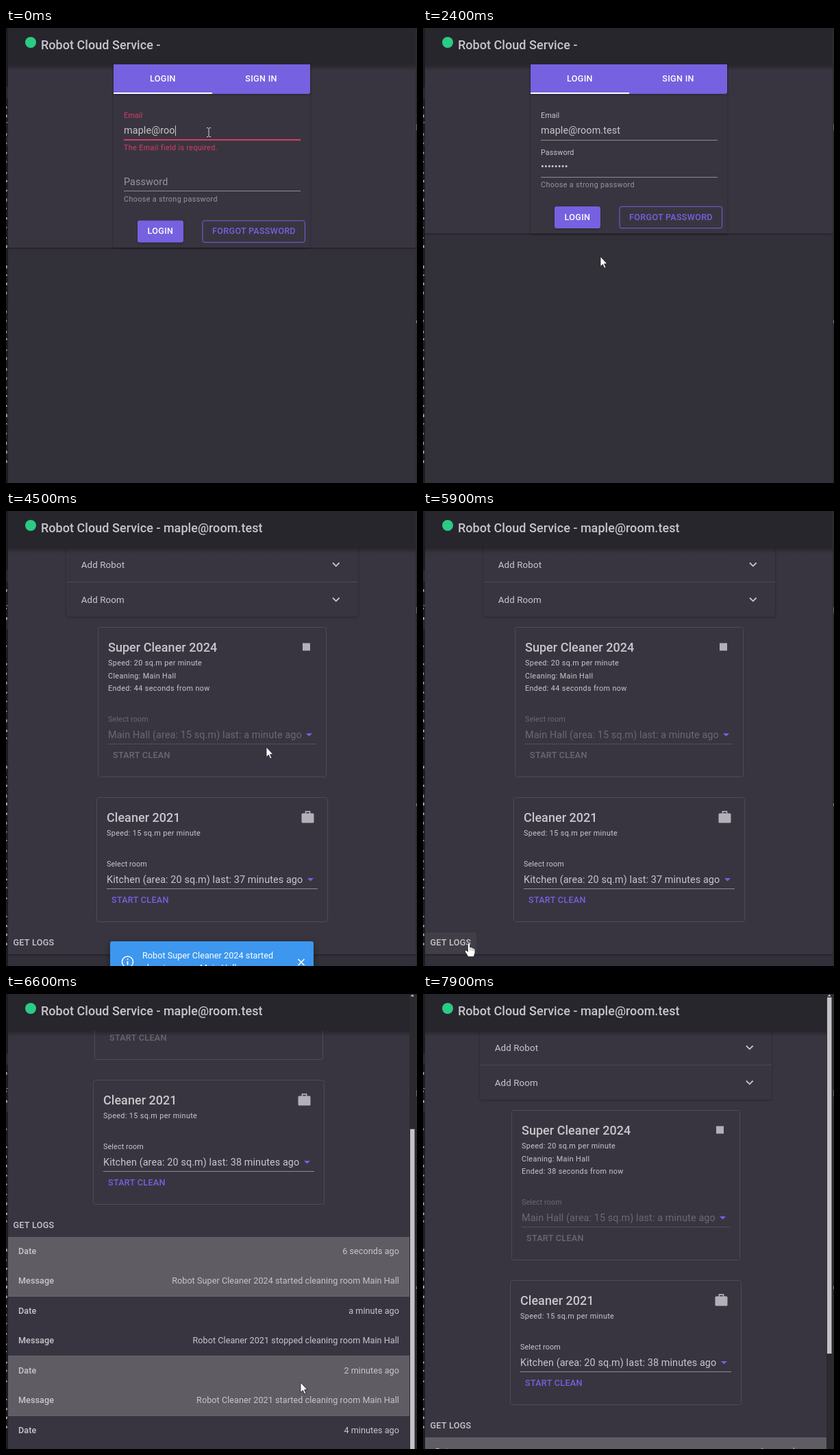
Recreate the animation shown at these times as an HTML page. Size 600 by 663 pixels, loop 8000 ms.

```html
<!DOCTYPE html>
<html lang="en">
<head>
<meta charset="utf-8">
<title>Robot service</title>
<style>
  html, body { margin: 0; width: 100%; height: 100%; overflow: hidden; background: #323039; }
  svg { display: block; width: 600px; height: 663px; font-family: Roboto, Arial, sans-serif; }
  text { white-space: pre; }
  .lift { filter: drop-shadow(0 1px 1.5px rgba(0, 0, 0, .32)); }
  .high { filter: drop-shadow(0 3px 5px rgba(0, 0, 0, .4)); }
</style>
</head>
<body>
<svg id="stage" viewBox="0 0 600 663"></svg>
<script>
const LOOP = 8000, STEP = 100;
const USER = 'maple@room.test';
const C = {
  page: '#323039', paper: '#393540', header: '#28262d', purple: '#7661e0', red: '#d63d63',
  text: '#c8c6cb', soft: '#98959d', off: '#6b6871', line: '#8d8a92', border: '#4f4b56', white: '#fff'
};
// [size, weight, letter spacing in em]
const F = {
  title: [18, 500, .002], body: [14.4, 400, .007], item: [13.4, 400, .007], label: [10.8, 400, .0094],
  caption: [10.8, 400, .0333], button: [12.6, 500, .025], cell: [12.6, 400, .005], head: [12.6, 500, .005]
};

// y is the middle of the capitals
const txt = (x, y, s, font, fill = C.text, anchor = 'start') => {
  const [size, weight, gap] = F[font];
  return `<text x="${x}" y="${(y + size * .355).toFixed(2)}" font-size="${size}" font-weight="${weight}" letter-spacing="${gap}em" fill="${fill}" text-anchor="${anchor}">${s}</text>`;
};
const rect = (x, y, w, h, fill, extra = '') => `<rect x="${x}" y="${y}" width="${w}" height="${h}" fill="${fill}" ${extra}/>`;
const path = (d, stroke, width = 1, extra = '') => `<path d="${d}" fill="none" stroke="${stroke}" stroke-width="${width}" ${extra}/>`;
const frame = (x, y, w, h, stroke) => rect(x + .5, y + .5, w - 1, h - 1, 'none', `rx="3" stroke="${stroke}"`);
const group = (x, y, s) => `<g transform="translate(${x} ${y})">${s}</g>`;

const clamp = v => Math.max(0, Math.min(1, v));
const ease = v => { v = clamp(v); return v * v * (3 - 2 * v); };

const ruler = document.createElement('canvas').getContext('2d');
function caret(x, y, s) {
  const [size, weight, gap] = F.body;
  ruler.font = `${weight} ${size}px Roboto, Arial, sans-serif`;
  return rect(Math.round(x + ruler.measureText(s).width + s.length * gap * size), y - 7, 1, 15, C.text);
}

// time, x, y, shape
const CURSOR = [
  [0, 296, 152, 'beam'], [1000, 296, 152, 'arrow'], [1500, 232, 276, 'hand'], [1700, 232, 276, 'arrow'],
  [1900, 259, 333, 'arrow'], [2500, 259, 333, 'arrow'], [3100, 300, 286, 'hand'], [3300, 300, 286, 'hand'],
  [3700, 237, 357, 'hand'], [3900, 237, 357, 'hand'], [4150, 196, 314, 'hand'], [4300, 196, 314, 'arrow'],
  [4500, 380, 344, 'arrow'], [4600, 380, 344, 'arrow'], [4850, 500, 540, 'arrow'], [5050, 431, 650, 'hand'],
  [5150, 431, 650, 'arrow'], [5700, 67, 629, 'hand'], [6100, 67, 629, 'arrow'], [6400, 430, 566, 'arrow'],
  [7200, 430, 566, 'arrow'], [7500, 250, 190, 'arrow'], [7900, 560, 690, 'arrow']
];
const SHAPES = {
  arrow: '<path d="M0 0V14.5L3.4 11.5L5.8 17L8 16L5.6 10.7H10Z" fill="#fff" stroke="#1b1a1f" stroke-width=".8"/>',
  beam: path('M-3 -6.5H-1L0 -5.5L1 -6.5H3M0 -5.5V5.5M-3 6.5H-1L0 5.5L1 6.5H3', '#d8d6da'),
  hand: '<path d="M-1.7 1.5Q0 -1.5 1.7 1.5V7Q3.5 6 4.6 7.6Q6 7 7 8.6Q8.8 8.3 9 10V15L7 20.5H-1L-5.5 13.5Q-6.5 10.5 -4 11L-1.7 13Z" fill="#fff" stroke="#1b1a1f" stroke-width=".8"/>' +
    path('M1.7 8V11M4.6 8.5V11.5M7 9.5V12', '#555', .7)
};
function cursor(t) {
  let i = CURSOR.length - 1;
  while (CURSOR[i][0] > t) i--;
  const a = CURSOR[i], b = CURSOR[i + 1] || a;
  const k = ease((t - a[0]) / (b[0] - a[0] || 1));
  return group((a[1] + (b[1] - a[1]) * k).toFixed(1), (a[2] + (b[2] - a[2]) * k).toFixed(1), SHAPES[a[3]]);
}

// Slivers of the windows behind the page
function edges(seed) {
  const rnd = () => (seed = (seed * 16807) % 2147483647) / 2147483647;
  let s = rect(0, 0, 3, 663, '#1d1c21') + rect(598, 0, 2, 663, '#2d2b32') +
    rect(0, 86, 3, 17, '#2b2930') + rect(0, 137, 3, 1.5, '#655aa0') + rect(0, 158, 3, 14, '#2b2930');
  for (let y = 112; y < 635; y += 13.6)
    if (rnd() < .85) s += rect(0, y + rnd() * 3, 1 + rnd(), 1.5 + rnd() * 3, '#a5a3aa');
  return s + rect(599, 140, 1, 9, '#69666f') + rect(599, 426, 1, 4, '#8f8c95');
}

const paper = bottom => rect(3, 0, 595, bottom, C.paper) + rect(3, bottom, 595, 1.3, '#232127') + rect(3, bottom + 1.3, 595, 1.2, '#2c2a32');

function login(t) {
  const typing = t < 800, focus = !typing && t < 1700;
  const dy = typing ? 0 : -20.6;
  const email = USER.slice(0, 9 + Math.floor(t / STEP));
  let s = paper(320 + dy) + rect(157, 53, 287, 267 + dy, C.paper, 'class="lift"') +
    rect(157, 53, 287, 43, C.purple, 'rx="3" class="lift"') + rect(157, 94, 144, 2, C.white) +
    txt(229, 74, 'LOGIN', 'button', C.white, 'middle') + txt(372.5, 74, 'SIGN IN', 'button', C.white, 'middle') +
    txt(172, 127, 'Email', 'label', typing ? C.red : C.text) + txt(172, 149, email, 'body');
  if (typing) {
    s += rect(172, 162, 258, 2, C.red) + txt(172, 174.5, 'The Email field is required.', 'caption', C.red) +
      caret(172, 149, email) + txt(172, 223.5, 'Password', 'body', C.soft) + rect(172, 237, 258, 1, C.line);
  } else {
    const dots = '•'.repeat(Math.max(0, Math.min(8, Math.floor((t - 800) / 85))));
    s += rect(172, 163, 258, 1, C.line) + txt(172, 181, 'Password', 'label', focus ? C.purple : C.text) +
      txt(172, 202, dots, 'body') + (focus ? caret(172, 202, dots) : '') +
      rect(172, focus ? 216 : 217, 258, focus ? 2 : 1, focus ? C.purple : C.line);
  }
  return s + txt(172, 249 + dy, 'Choose a strong password', 'caption', C.soft) +
    rect(192, 280.5 + dy, 67, 32, C.purple, 'rx="3" class="lift"') +
    txt(225.5, 296 + dy, 'LOGIN', 'button', C.white, 'middle') +
    frame(286.5, 280.3 + dy, 150.5, 32.5, C.purple) +
    txt(362, 296 + dy, 'FORGOT PASSWORD', 'button', C.purple, 'middle');
}

function accordion() {
  const row = (y, s) => txt(109.7, y, s, 'item') + path(`M477 ${y - 2.5}l4.8 4.8l4.8 -4.8`, C.text, 1.8);
  return rect(88, 40, 426, 114, C.paper, 'rx="3" class="lift"') + rect(88, 103, 426, 1, '#4d4954') +
    row(78, 'Add Robot') + row(129, 'Add Room');
}

const caseIcon = group(431.5, 188.5, rect(0, 4, 18, 14, '#b3b0b8', 'rx="1.6"') + path('M6 4.5V1.3H12V4.5', '#b3b0b8', 1.7));

// Job holds the extra lines shown while a robot is busy
function card(y, name, speed, room, job) {
  const x = job ? 134 : 132, w = job ? 334 : 338, left = x + 15, right = x + w - 15;
  const dy = job ? 37 : 0, ink = job ? C.off : C.text;
  const under = y + 133.5 + dy;
  let s = frame(x, y, w, 182 + dy, C.border) + txt(left, y + 29.5, name, 'title') +
    txt(left, y + 52, `Speed: ${speed} sq.m per minute`, 'caption');
  s += job ? job.map((line, i) => txt(left, y + 71 + i * 18.6, line, 'caption')).join('') + rect(433, y + 23.5, 11, 11, '#b3b0b8')
    : group(0, y - 169, caseIcon);
  return s + txt(left, y + 97 + dy, 'Select room', 'label', ink) + txt(left, y + 119.5 + dy, room, 'body', ink) +
    `<path d="M${right - 15} ${y + 118 + dy}h9l-4.5 4.5z" fill="${C.purple}"/>` +
    path(`M${left} ${under}H${right}`, job ? C.off : C.line, 1, job ? 'stroke-dasharray="1.5 1.5"' : '') +
    txt(left + 7, y + 149.5 + dy, 'START CLEAN', 'button', job ? C.off : C.purple);
}

function menu(rooms, hover) {
  const tint = (on, i) => on ? rect(147, 260 + i * 64.5, 308, 64.5, i ? '#3f3c43' : '#3b364a') : '';
  return rect(147, 260, 308, 193.5, '#38353c', 'rx="3" class="high"') + rooms.map((room, i) => {
    const ink = i ? C.text : C.purple, y = 281 + i * 64.5;
    return tint(i === 0 || i === hover, i) + txt(161, y, room.replace(/ ago$/, ''), 'body', ink) + txt(161, y + 21.5, 'ago', 'body', ink);
  }).join('');
}

const LOGS = [
  ['6 seconds ago', 'Robot Super Cleaner 2024 started cleaning room Main Hall'],
  ['a minute ago', 'Robot Cleaner 2021 stopped cleaning room Main Hall'],
  ['2 minutes ago', 'Robot Cleaner 2021 started cleaning room Main Hall'],
  ['4 minutes ago', 'Robot Cleaner 2021 stopped cleaning room Bedroom']
];
const logs = top => LOGS.map(([date, message], i) => {
  const y = top + i * 87;
  return rect(3, y, 586, 87, i % 2 ? C.paper : '#5f5c64') + rect(3, y + 86, 586, 1, '#68656e') +
    txt(18, y + 21, 'Date', 'head') + txt(574, y + 21, date, 'cell', C.text, 'end') +
    txt(18, y + 64, 'Message', 'head') + txt(574, y + 64, message, 'cell', C.text, 'end');
}).join('');

function toast(t) {
  const y = 627 + 40 * (1 - ease((t - 4300) / 200)) + 40 * ease((t - 5150) / 200);
  return group(0, y, rect(152, 0, 297, 60, '#3d97ee', 'rx="3" class="high"') +
    `<circle cx="177.5" cy="30" r="8" fill="none" stroke="#fff" stroke-width="1.5"/>` +
    path('M177.5 29V34.5M177.5 25.5V27.2', C.white, 1.7) +
    txt(199, 21, 'Robot Super Cleaner 2024 started', 'cell', C.white) +
    txt(199, 39, 'cleaning room Main Hall', 'cell', C.white) +
    path('M426.5 26l9 9m0 -9l-9 9', C.white, 1.6));
}

function dashboard(t) {
  const loaded = t >= 6200, busy = t >= 4400;
  const scroll = 292 * (ease((t - 6250) / 350) - ease((t - 6850) / 350));
  const rooms = [
    `Kitchen (area: 20 sq.m) last: ${loaded ? 38 : 37} minutes ago`,
    'Main Hall (area: 15 sq.m) last: a minute ago',
    'Bedroom (area: 30 sq.m) last: 4 minutes ago'
  ];
  const job = busy && ['Cleaning: Main Hall', `Ended: ${loaded ? 38 : 44} seconds from now`];
  const shift = busy ? 38 : 0, bottom = 608 + shift;
  let cards = accordion() + card(169, 'Super Cleaner 2024', 20, rooms[t >= 4000 ? 1 : 0], job) +
    card(379 + shift, 'Cleaner 2021', 15, rooms[0]);
  if (t >= 3300 && t < 4000) cards += menu(rooms, t >= 3600 ? 1 : 0);
  const hover = t >= 5600 && t < 6200 ? rect(3, bottom - 32, 75, 31, '#423e47', 'rx="3"') : '';
  let s = group(0, -scroll.toFixed(2), paper(bottom) + group(loaded ? -5 : 0, 0, cards) + hover +
    txt(10.4, bottom - 17, 'GET LOGS', 'button') + (loaded ? logs(bottom) : ''));
  if (t >= 4300 && t < 5400) s += toast(t);
  if (loaded) s += rect(589, 0, 9, 663, '#2b2a2e') + rect(590, 5 + scroll * .657, 6.5, 519, '#c5c3c7') +
    '<path d="M590.5 3.5l2.7 -3l2.7 3z" fill="#c5c3c7"/>';
  return s;
}

function header(t) {
  const w = t >= 6200 ? 586 : 595;
  return '<defs><linearGradient id="shade" x2="0" y2="1"><stop stop-color="#000" stop-opacity=".32"/><stop offset="1" stop-color="#000" stop-opacity="0"/></linearGradient></defs>' +
    rect(3, 53, w, 9, 'url(#shade)') + rect(3, 0, w, 53, C.header) +
    '<circle cx="36" cy="21" r="8" fill="#2bcb86"/>' +
    txt(51, 25, 'Robot Cloud Service -' + (t >= 2500 ? ' ' + USER : ''), 'title');
}

const stage = document.getElementById('stage');
function render(t) {
  const inside = t >= 2500;
  // The login form covers the header shadow, the dashboard scrolls below it
  const view = inside ? dashboard(t) + header(t) : header(t) + login(t);
  stage.innerHTML = rect(0, 0, 600, 663, C.page) +
    (inside ? view : login(t) + header(t) + rect(157, 53, 287, 10, C.purple)) +
    edges(inside ? 4711 : 97) + cursor(t);
}

let shown = -1;
const start = performance.now();
function tick() {
  const t = Math.floor(((performance.now() - start) % LOOP) / STEP) * STEP;
  if (t !== shown) render(shown = t);
  requestAnimationFrame(tick);
}
tick();
</script>
</body>
</html>
```
